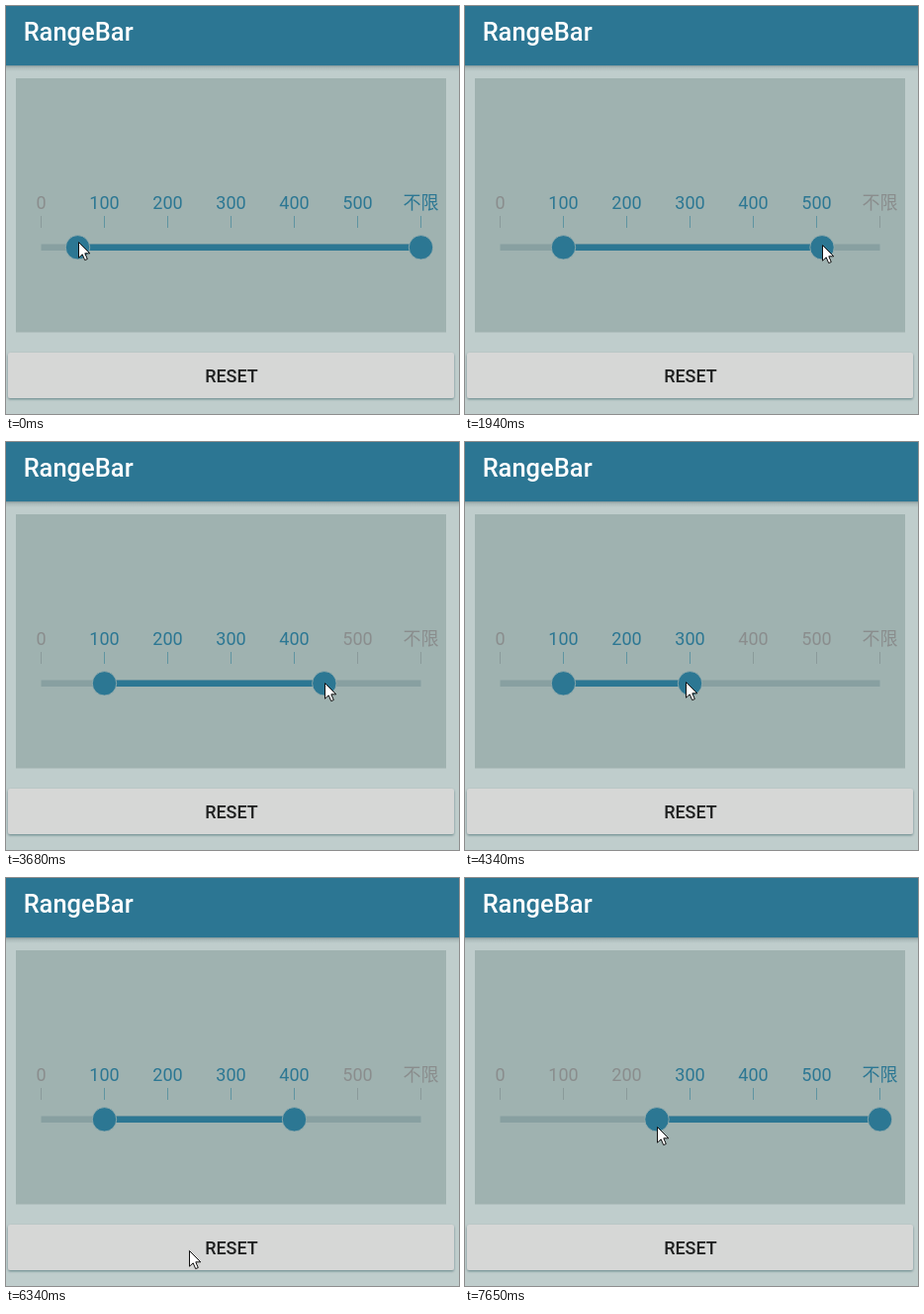
Recreate the animation shown at these times as an HTML page. Size 458x412 px, loop 8 s.

```html
<!DOCTYPE html>
<html lang="en">
<head>
<meta charset="utf-8">
<title>RangeBar</title>
<style>
  html, body { margin: 0; width: 100%; height: 100%; overflow: hidden; background: #bfcdcc; }
  svg { display: block; width: 458px; height: 412px; }
  text { font-family: Roboto, "Noto Sans CJK SC", "Noto Sans CJK", sans-serif; }
  .label { font-size: 18px; text-anchor: middle; fill: #8a8d8d; }
  .label.on { fill: #2c7793; }
  .tick { fill: #8a9a9a; }
  .tick.on { fill: #5f94a1; }
  .thumb { fill: #2c7793; stroke: #9fb2b0; stroke-width: .8; }
</style>
</head>
<body>
<svg viewBox="0 0 458 412">
  <defs>
    <linearGradient id="shade" x2="0" y2="1">
      <stop offset="0" stop-color="#5d7479" stop-opacity=".6"/>
      <stop offset=".4" stop-color="#7f9294" stop-opacity=".3"/>
      <stop offset="1" stop-color="#7f9294" stop-opacity="0"/>
    </linearGradient>
    <filter id="lift" x="-5%" y="-20%" width="110%" height="150%">
      <feDropShadow dx="0" dy="1.2" stdDeviation="1.2" flood-color="#10303a" flood-opacity=".45"/>
    </filter>
    <clipPath id="face"><rect x="2" y="350" width="451" height="46" rx="2.5"/></clipPath>
  </defs>
  <rect width="458" height="412" fill="#bfcdcc"/>
  <rect y="60" width="458" height="6" fill="url(#shade)"/>
  <rect width="458" height="60" fill="#2c7693"/>
  <text x="17.7" y="35" font-size="25.5" font-weight="500" fill="#fff">RangeBar</text>
  <rect x="10" y="73" width="435" height="256.5" fill="#9fb2b0"/>
  <g id="scale"></g>
  <rect x="35.5" y="240.5" width="384" height="6.5" fill="#88a0a1"/>
  <rect id="bar" y="240.5" height="6.5" fill="#2c7793"/>
  <circle id="low" class="thumb" cy="243.8" r="12.2"/>
  <circle id="high" class="thumb" cy="243.8" r="12.2"/>
  <rect x="2" y="350" width="451" height="46" rx="2.5" fill="#d6d7d6" filter="url(#lift)"/>
  <circle id="ripple" cx="185" cy="376" clip-path="url(#face)"/>
  <text x="228" y="380" font-size="18" font-weight="500" text-anchor="middle" fill="#1f2020">RESET</text>
  <path id="cursor" d="M.5 .5V16.2L4.2 12.8L6.7 18.6L9.3 17.5L6.8 11.8H11.8Z" fill="#fff" stroke="#111"/>
</svg>
<script>
const LOOP = 8000, STEP = 60, PRESS = 6340, FADE = 540;
const $ = id => document.getElementById(id);
const stops = ["0", "100", "200", "300", "400", "500", "不限"];
const place = i => 35.5 + 64 * i;
const MIN = place(0), MAX = place(stops.length - 1);
const clamp = x => Math.min(MAX, Math.max(MIN, x));
const nearest = x => place(Math.round((x - MIN) / 64));

// Pointer moves: start, end, x, y, and what the move does
const moves = [
  [250, 1030, 428, 245],
  [1090, 1150, 422, 244],
  [1400, 1940, 361, 241, "high"],
  [2310, 2600, 373, 240],
  [2840, 2900, 308, 240],
  [3080, 3080, 332, 241],
  [3140, 3200, 344, 242],
  [3440, 3500, 357, 244],
  [3560, 4160, 228, 242, "high"],
  [4340, 4340, 223, 242],
  [4400, 4400, 218, 242, "high"],
  [4460, 4580, 273, 244, "high"],
  [4830, 5070, 323, 252],
  [5130, 5250, 374, 288],
  [5310, 5610, 150, 261],
  [5670, 6090, 185, 385],
  [PRESS, PRESS, 185, 376],
  [6400, 6930, 36, 249, "reset"],
  [7110, 7650, 194, 251, "low"]
];

// Dragged thumbs follow the pointer; released ones snap to the nearest stop.
function stateAt(t) {
  const s = { x: 73, y: 238, low: 72.5, high: MAX };
  for (const [start, end, x, y, action] of moves) {
    if (t < start) break;
    const steps = Math.floor((t - start) / STEP) + 1;
    const p = t >= end ? 1 : steps * STEP / (end - start + STEP);
    s.x += (x - s.x) * p;
    s.y += (y - s.y) * p;
    if (action === "reset") {
      s.low = MIN;
      s.high = MAX;
    } else if (action) {
      s[action] = clamp(s.x);
    } else {
      s.low = nearest(s.low);
      s.high = nearest(s.high);
    }
  }
  return s;
}

function set(el, attrs) {
  for (const k in attrs) el.setAttribute(k, attrs[k]);
  return el;
}

function add(tag, attrs, text = "") {
  const el = set(document.createElementNS("http://www.w3.org/2000/svg", tag), attrs);
  el.textContent = text;
  return $("scale").appendChild(el);
}

const marks = stops.map((text, i) => {
  const x = place(i);
  return [
    add("text", { class: "label", x, y: 205.3 }, text),
    add("rect", { class: "tick", x: x - .5, y: 212, width: 1, height: 12 })
  ];
});

function draw(t) {
  const { x, y, low, high } = stateAt(t);
  set($("low"), { cx: low });
  set($("high"), { cx: high });
  set($("bar"), { x: low, width: high - low });
  marks.forEach((parts, i) => {
    const on = place(i) >= low && place(i) <= high;
    for (const p of parts) p.classList.toggle("on", on);
  });

  const age = t - PRESS, live = age >= 0 && age < FADE;
  set($("ripple"), { r: live ? age * .85 : 0, opacity: live ? .09 * (1 - age / FADE) : 0 });
  set($("cursor"), { transform: `translate(${Math.round(x)} ${Math.round(y)})` });
}

const began = performance.now();
function tick() {
  draw((performance.now() - began) % LOOP);
  requestAnimationFrame(tick);
}
tick();
</script>
</body>
</html>
```
